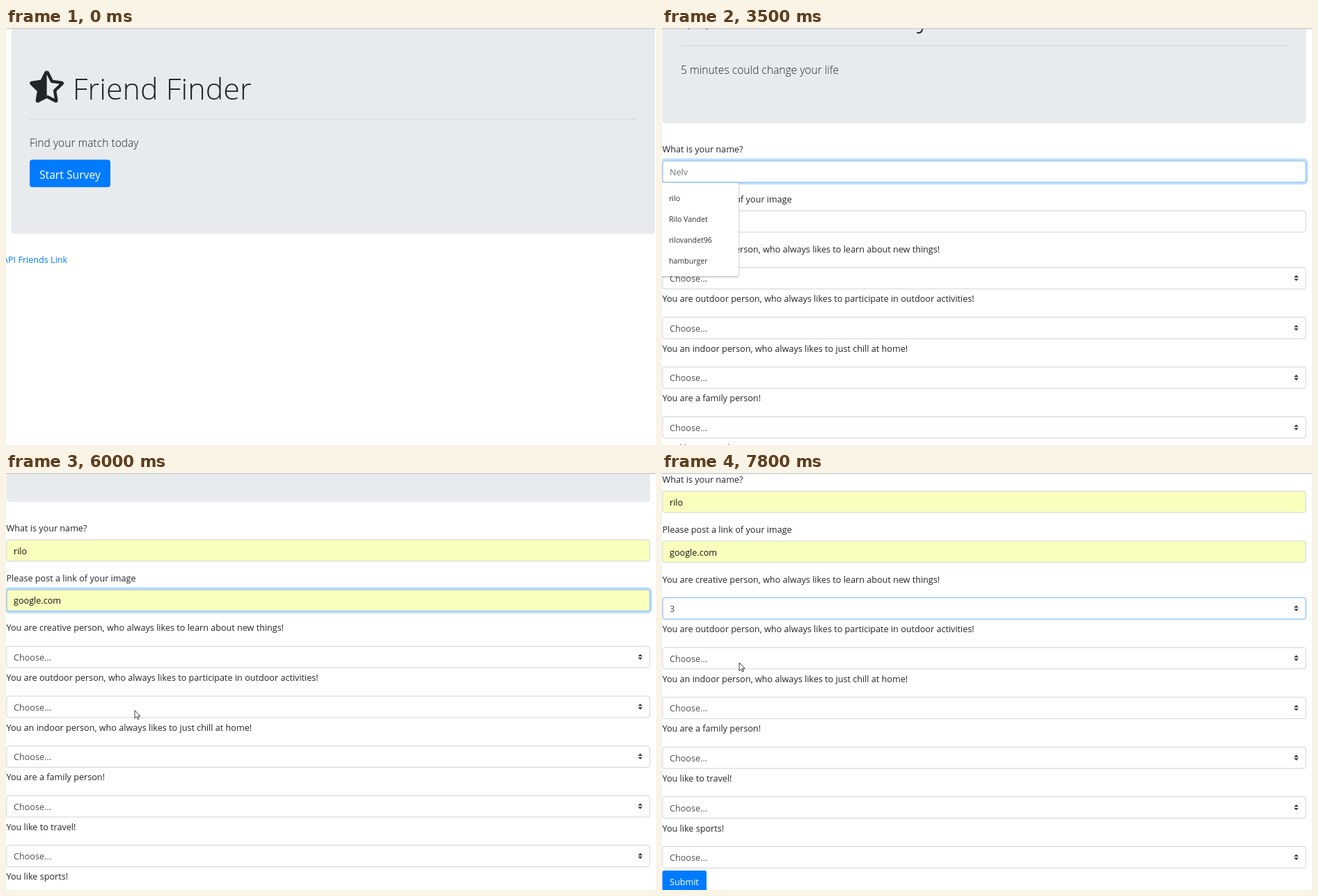
These frames come from a looping animation (934 px wide and 600 px high, 8 s). An HTML page:

```html
<!DOCTYPE html>
<html lang="en">
<head>
<meta charset="utf-8">
<title>Friend Finder</title>
<style>
  html, body { margin: 0; width: 100%; height: 100%; overflow: hidden; background: #fff; }
  svg { display: block; width: 100vw; height: 100vh; font: 12.63px "Open Sans", "Noto Sans", sans-serif; }
  .title { font-size: 43.1px; font-weight: 300; }
  .lead { font-size: 15.6px; font-weight: 300; }
  .large { font-size: 15.7px; }
  .small { font-size: 10.6px; }
  .popup { filter: drop-shadow(0 1px 1.5px rgba(0, 0, 0, .35)); }
</style>
</head>
<body>
<svg id="stage" viewBox="0 0 934 600"></svg>
<script>
const LOOP = 8000, TICK = 100;
const INK = '#212529', GREY = '#495057', MUTED = '#6c757d', BLUE = '#007bff';
const AUTOFILL = '#faffbd', PANEL = '#e8ebee';

const QUESTIONS = [
  'You are creative person, who always likes to learn about new things!',
  'You are outdoor person, who always likes to participate in outdoor activities!',
  'You an indoor person, who always likes to just chill at home!',
  'You are a family person!',
  'You like to travel!',
  'You like sports!'
];
const OPTIONS = ['Choose...', '1 (No, I\'m not)', '2', '3', '4', '5 (oh yes I am)'];
const NAMES = ['rilo', 'Rilo Vandet', 'rilovandet96', 'hamburger'];
const LINKS = ['google.com'];

// Keys: [time, value, ...]
const SCROLL = [[1800, 0], [1900, 15], [2000, 52], [2100, 88], [2200, 105.4], [5900, 105.4],
  [6000, 200.6], [6100, 200.6], [6200, 255], [6300, 270.5]];
const POINTER = [[0, 4, -20], [100, 4, -14], [700, 98, 206], [1200, 100, 208], [1600, 150, 308],
  [3600, 60, 225], [3700, 50, 240], [4100, 50, 240], [4500, 116, 297], [4900, 90, 300],
  [5000, 80, 307], [5100, 78, 309], [5300, 74, 317], [5600, 74, 317], [5800, 185, 341.5],
  [6500, 185, 341.5], [6900, 134, 190], [7100, 134, 192], [7300, 129.5, 233], [7400, 125, 242],
  [7500, 118, 258], [7600, 111, 273]];

const within = (t, from, to) => t >= from && t < to;

function sample(keys, t) {
  const next = keys.findIndex(key => key[0] > t);
  if (next < 0) return keys[keys.length - 1].slice(1);
  if (next === 0) return keys[0].slice(1);
  const a = keys[next - 1], b = keys[next];
  const k = (t - a[0]) / (b[0] - a[0]);
  return a.slice(1).map((v, i) => v + (b[i + 1] - v) * k);
}

const text = (x, y, str, fill = INK, cls = '') =>
  `<text x="${x}" y="${y}" fill="${fill}" class="${cls}">${str}</text>`;
const rect = (x, y, w, h, fill, extra = '') =>
  `<rect x="${x}" y="${y}" width="${w}" height="${h}" fill="${fill}" ${extra}/>`;
const group = (x, y, content) => `<g transform="translate(${x} ${y})">${content}</g>`;

// Half a star with rounded tips; its mirror image completes the outline.
const HALF_STAR = 'M288 28Q298 30 303 40L368 174L520 195Q540 200 527 211L413 320L438 470Q439 489 424 482L288 412';
const star = group(25.2, 60.8, `<g transform="scale(.0917)" stroke="${INK}" stroke-width="48" stroke-linejoin="round">
  <path d="${HALF_STAR}" fill="none"/>
  <path d="${HALF_STAR}" fill="${INK}" transform="matrix(-1 0 0 1 576 0)"/></g>`);

const banner = (bottom, title, titleX, lead) =>
  rect(.5, 1, 925, bottom - 1, PANEL, 'rx="4.5"') + star +
  text(titleX, 103, title, INK, 'title') +
  rect(27, 130.5, 872, 1, '#d4d7da') +
  text(27, 171, lead, INK, 'lead');

function box(top, focus, fill = '#fff', ring = true) {
  const halo = focus && ring
    ? rect(-1, top - 1.7, 928, 34.9, 'none', `rx="5" stroke="${BLUE}" stroke-opacity="${.25 * focus}" stroke-width="2.7"`)
    : '';
  const frame = stroke => rect(.9, top + .4, 924.2, 30.8, 'none', `rx="3.2" stroke="${stroke}" `);
  return halo + rect(.9, top + .4, 924.2, 30.8, fill, 'rx="3.2"') + frame('#ced4da') +
    (focus ? `<g opacity="${focus}">${frame('#80bdff')}</g>` : '');
}

const input = (top, label, placeholder, value, focus) =>
  text(.5, top - 11.7, label) + box(top, focus, value ? AUTOFILL : '#fff') +
  text(11, top + 21, value || placeholder, value ? '#111' : MUTED);

const select = (i, value, focus) => {
  const top = 449.6 + 71.6 * i;
  return text(.5, top - 21.6, QUESTIONS[i]) + box(top, focus, '#fff', false) +
    text(11, top + 21, value, GREY) +
    `<path transform="translate(908 ${top + 11.4}) scale(1.68)" fill="#343a40" d="M2 0L0 2h4zm0 5L0 3h4z"/>`;
};

const suggestions = (top, width, items, active) =>
  rect(-4, top, width + 4, items.length * 30 + 14, '#fff', 'rx="3" class="popup"') +
  items.map((item, i) =>
    (i === active ? rect(0, top + 7 + i * 30, width, 30, '#e8eaed') : '') +
    text(10, top + 25.7 + i * 30, item, '#333', 'small')).join('');

const optionList = active =>
  rect(1, 210.5, 925, 112.5, '#fff') +
  OPTIONS.map((option, i) =>
    (i === active ? rect(1, 210.8 + 18.7 * i, 925, 18.7, '#1e90ff') : '') +
    text(12, 225.2 + 18.7 * i, option, i === active ? '#fff' : GREY)).join('') +
  rect(1, 210.5, 1, 112.5, '#444') + rect(1, 322.3, 925, 1, '#8fa6c4');

const pointer = ([x, y]) => group(x, y,
  '<path d="M0 0V11.5L2.7 9L4.5 13L6.3 12.2L4.6 8.4H8Z" fill="#fff" stroke="#222" stroke-width=".9"/>');

function home(t) {
  const ring = t >= 1000
    ? rect(32.6, 188.1, 118.8, 42.4, 'none', `rx="5" stroke="${BLUE}" stroke-opacity=".5" stroke-width="2.7"`)
    : '';
  return group(7, 0, banner(296, 'Friend Finder', 88.8, 'Find your match today')) + ring +
    rect(34, 189.5, 116, 39.6, t >= 700 ? '#0069d9' : BLUE, 'rx="4"') +
    text(48, 216.7, 'Start Survey', '#fff', 'large') +
    text(-5, 338, 'API Friends Link', BLUE);
}

function survey(t) {
  const nameFocus = within(t, 3100, 4700) ? (t < 3200 ? .5 : 1) : 0;
  const linkFocus = within(t, 4700, 7000) ? (t < 4800 ? .5 : 1) : 0;
  const page =
    banner(242.4, 'Take the survey', 89.7, '5 minutes could change your life') +
    input(296.2, 'What is your name?', 'Nelv', t >= 3700 && NAMES[0], nameFocus) +
    input(368, 'Please post a link of your image', '!@#@!#$@@.jpg', t >= 5000 && LINKS[0], linkFocus) +
    QUESTIONS.map((_, i) =>
      select(i, i === 0 && t >= 7800 ? '3' : 'Choose...', i === 0 && t >= 7000 ? 1 : 0)).join('') +
    rect(.5, 842.5, 63.5, 32, BLUE, 'rx="3.2"') + text(11, 863.5, 'Submit', '#fff');

  let overlay = '';
  if (within(t, 2900, 3500)) overlay += rect(11, 198, 1, 18, '#222');
  if (within(t, 4200, 4500)) overlay += rect(36.5, 198, 1, 18, '#222');
  if (within(t, 4700, 5300)) overlay += rect(11, 270, 1, 18, '#222');
  if (within(t, 3200, 4000)) overlay += suggestions(223, 110, NAMES, t >= 3700 ? 0 : -1);
  if (within(t, 4800, 5500)) overlay += suggestions(295, 100, LINKS, t >= 5000 ? 0 : -1);
  if (within(t, 7100, 7800)) overlay += optionList(Math.min(3, Math.max(0, (t - 7300) / TICK)));
  return group(0, -sample(SCROLL, t)[0], page) + overlay;
}

function render(t) {
  const pointerShown = within(t, 100, 1600) || within(t, 3700, 4600) || t >= 5000;
  return (t < 1200 ? home(t) : survey(t)) +
    rect(0, 0, 934, 1.5, '#cdcfd1') +
    (pointerShown ? pointer(sample(POINTER, t)) : '');
}

const stage = document.getElementById('stage');
const start = performance.now();
let shown = -1;
function play() {
  const t = Math.floor((performance.now() - start) % LOOP / TICK) * TICK;
  if (t !== shown) stage.innerHTML = render(shown = t);
  requestAnimationFrame(play);
}
play();
</script>
</body>
</html>
```
